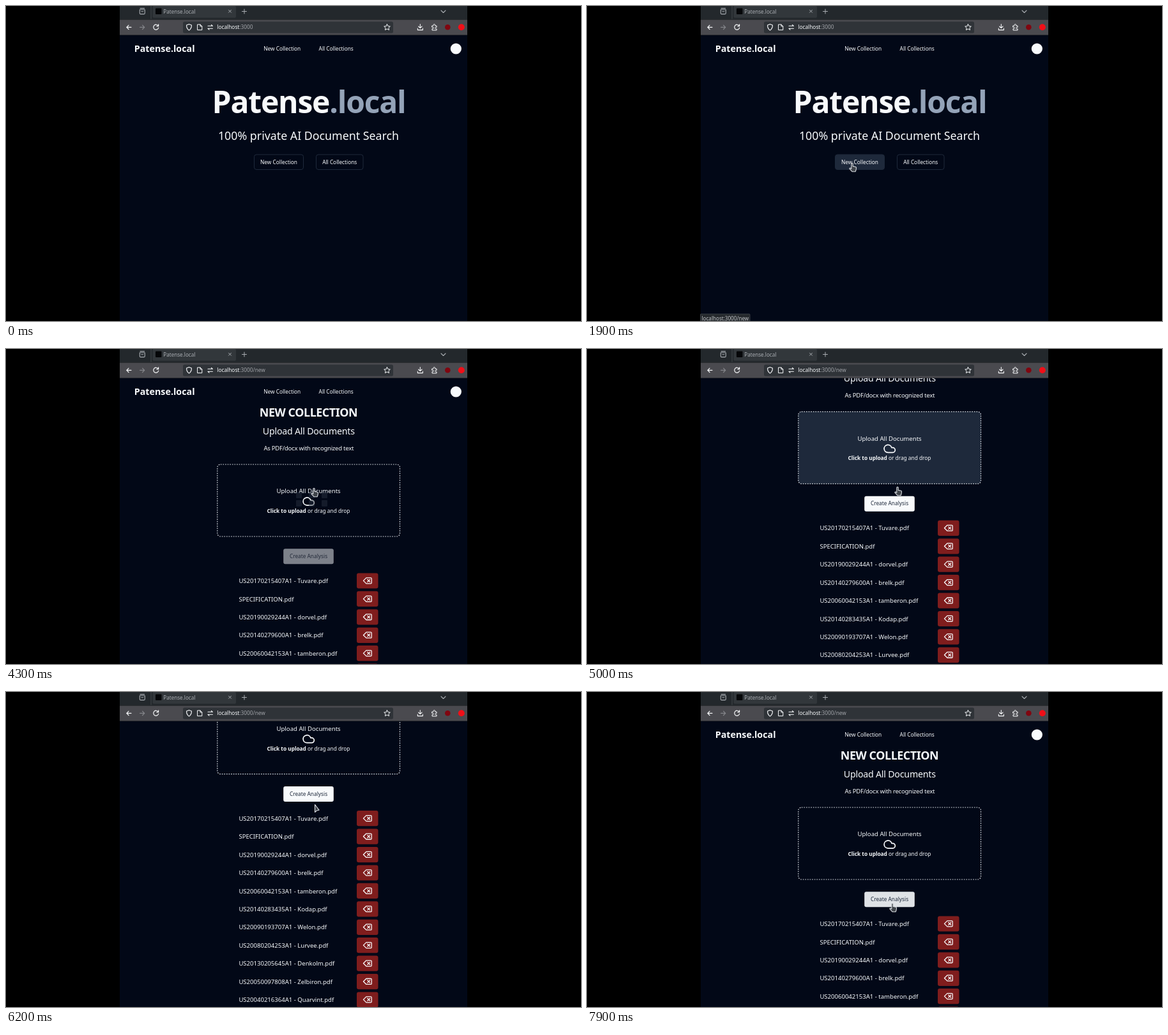
Write an HTML page that moves like this. It is 900 px wide and 494 px high and loops after 8 s.

```html
<!DOCTYPE html>
<html lang="en">
<head>
<meta charset="utf-8">
<title>Patense.local</title>
<style>
html, body { margin: 0; width: 100%; height: 100%; overflow: hidden; background: #000; }
svg { display: block; width: 900px; height: 494px; font-family: "Noto Sans", sans-serif; }
text { white-space: pre; }
</style>
</head>
<body>
<svg id="stage" viewBox="0 0 900 494" xmlns="http://www.w3.org/2000/svg"></svg>
<script>
const LOOP = 8000, STEP = 100;
const INK = '#f8fafc', PAGE = '#020817', SLATE = '#1e293b', RED = '#7f1d1d';
const stage = document.getElementById('stage');

const text = (x, y, size, str, o = {}) =>
  `<text x="${x}" y="${y}" font-size="${size}" fill="${o.fill || INK}" font-weight="${o.weight || 400}"` +
  ` text-anchor="${o.anchor || 'middle'}" letter-spacing="${(o.track || 0) * size}">${str}</text>`;
const left = (x, y, size, str, o = {}) => text(x, y, size, str, { ...o, anchor: 'start' });
const rect = (x, y, w, h, fill, r = 0, extra = '') =>
  `<rect x="${x}" y="${y}" width="${w}" height="${h}" rx="${r}" fill="${fill}" ${extra}/>`;
const line = (d, color = INK, w = 1.2) =>
  `<path d="${d}" fill="none" stroke="${color}" stroke-width="${w}" stroke-linecap="round" stroke-linejoin="round"/>`;
const dot = (x, y, r, fill) => `<circle cx="${x}" cy="${y}" r="${r}" fill="${fill}"/>`;
// 24-unit icon centred on (x, y)
const icon = (x, y, s, d) =>
  `<g transform="translate(${x} ${y}) scale(${s}) translate(-12 -12)">${line(d, INK, 2)}</g>`;

const CLOUD = 'M17.5 19H9a7 7 0 1 1 6.71-9h1.79a4.5 4.5 0 1 1 0 9Z';
const ERASE = 'M20 5H9l-7 7 7 7h11a2 2 0 0 0 2-2V7a2 2 0 0 0-2-2ZM18 9l-6 6M12 9l6 6';
const HAND = 'M3.2 9.2V1.4a1.2 1.2 0 0 1 2.4 0V5.4l4.2.9q1.2.4 1.1 1.8l-.5 3.2-.9 2.5H4.6L.4 9.4q-.4-1.3.8-1.4Z';
const ARROW = 'M.5 .5V12.5L3.4 10 7 9.2Z';

const FILES = [
  'US20170215407A1 - Tuvare', 'SPECIFICATION', 'US20190029244A1 - dorvel',
  'US20140279600A1 - brelk', 'US20060042153A1 - tamberon', 'US20140283435A1 - Kodap',
  'US20090193707A1 - Welon', 'US20080204253A1 - Lurvee', 'US20130205645A1 - Denkolm',
  'US20050097808A1 - Zelbiron', 'US20040216364A1 - Quarvint'
];

// page areas that react to the pointer: x, y, width, height
const NEW_BUTTON = [388, 233, 78, 24];
const DROP_ZONE = [330.8, 181, 285.7, 113];
const CREATE = [434.2, 313.3, 78.6, 24];

// moments of the session, in ms
const OPENED = 2300, DRAG = 3200, DROP = 4200, READY = 4400;

// time, x, y of the pointer tip
const PATH = [
  [900, 910, 328], [1000, 712, 328], [1100, 636, 400], [1300, 630, 404], [1800, 415, 246],
  [2300, 415, 246], [2900, 868, 300], [3000, 910, 300], [3100, 910, 300], [3200, 782, 286],
  [3900, 482, 218], [4300, 482, 218], [4700, 486, 216], [5200, 486, 216], [5900, 483, 176],
  [6900, 483, 176], [7400, 480, 300], [7800, 478, 331]
];

const clamp = v => Math.max(0, Math.min(1, v));
const ease = v => v * v * (3 - 2 * v);
const ramp = (t, a, b) => ease(clamp((t - a) / (b - a)));
const within = (t, a, b) => t >= a && t < b;

function pointerAt(t) {
  const i = PATH.findIndex(p => t <= p[0]);
  if (i < 1) return PATH[i < 0 ? PATH.length - 1 : 0].slice(1);
  const [t0, x0, y0] = PATH[i - 1], [t1, x1, y1] = PATH[i];
  const k = ease((t - t0) / (t1 - t0));
  return [x0 + (x1 - x0) * k, y0 + (y1 - y0) * k];
}

const scrollAt = t => 165.3 * (ramp(t, 4800, 5200) - ramp(t, 6300, 6900));

// hover reacts one step late
function over(t, [x, y, w, h]) {
  const [px, py] = pointerAt(t - STEP);
  return within(px, x, x + w) && within(py + scrollAt(t - STEP), y, y + h);
}

function browser(active, url) {
  const dim = active ? INK : '#a9adb2';
  return rect(178, 0, 544, 21.5, active ? '#31363b' : '#23282c') +
    rect(178, 21.5, 544, 24, '#4a4a4f') +
    rect(229.5, 0, 130.5, 18.5, active ? '#4a4a4f' : '#32373b', 2) +
    line('M227 0V20', '#4a4e53', .8) +
    rect(234, 3.5, 9.5, 9.5, '#050608', 1) +
    left(246.3, 12, 8.1, 'Patense.local', { fill: dim }) +
    line('M348.5 6.2l4 4m0-4l-4 4', dim, 1) +
    line('M369.5 8.5h7m-3.5-3.5v7', dim, 1) +
    line('M681 7l3.5 3.5L688 7', dim, 1.1) +
    line('M209.3 5.8h8v5.4q0 1.4-1.4 1.4h-5.2q-1.4 0-1.4-1.4ZM210 3.6h6.6M211.8 8.8h3', dim, 1.1) +
    line('M196 33.3h-7.2m3.2-3.2l-3.2 3.2 3.2 3.2') +
    line('M209.6 33.3h7.2m-3.2-3.2l3.2 3.2-3.2 3.2', '#85868b') +
    line('M238.3 31.2a4 4 0 1 0 .4 3M238.6 28.8v2.8h-2.8') +
    rect(277, 24.5, 329, 18, '#2f3338', 2.5) +
    line('M286.5 28.6l3.9 1.5q.2 5.4-3.9 8-4.1-2.6-3.9-8Z', INK, 1.1) +
    line('M300 29h4l2.8 2.8v5.8H300ZM304 29v2.8h2.8', INK, 1) +
    line('M316 31.3h7.4m-2-1.8l2 1.8M323.4 35.3H316m2 1.8l-2-1.8', INK, 1.1) +
    left(330.3, 36.2, 8.3, `localhost<tspan fill="#a0a3a8">:3000${url}</tspan>`) +
    line('M596.5 28.6l1.5 3 3.3.4-2.4 2.3.6 3.3-3-1.6-3 1.6.6-3.3-2.4-2.3 3.3-.4Z', INK, 1) +
    line('M648.3 28.5v6m-2.7-2.5l2.7 2.6 2.7-2.6M644.3 35v2.6h8V35', INK, 1.1) +
    line('M667 31h2v-1.2a1.3 1.3 0 0 1 2.6 0V31h2.4v2.4h-1.2a1.2 1.2 0 0 0 0 2.4h1.2V38h-7v-2.4h1a1.2 1.2 0 0 0 0-2.4h-1Z', INK, 1) +
    dot(691.3, 33.2, 4.3, '#800610') + dot(712.8, 33.2, 5, '#f00f18');
}

const header = () =>
  left(200.7, 72.2, 14.3, 'Patense.local', { weight: 700 }) +
  text(432.2, 70, 8.3, 'New Collection', { weight: 500 }) +
  text(516.7, 70, 8.3, 'All Collections', { weight: 500 }) +
  dot(704.3, 67, 8.6, INK);

const homeButton = ([x, y, w, h], label, hover) =>
  rect(x + .5, y, w - 1, h - .5, hover ? SLATE : 'none', 3.5, `stroke="${SLATE}"`) +
  text(x + w / 2, y + 14.6, 8.3, label, { weight: 500 });

const home = t =>
  text(474, 168.2, 48, 'Patense<tspan fill="#94a3b8">.local</tspan>', { weight: 700, track: -.025 }) +
  text(473.5, 210.2, 17.8, '100% private AI Document Search') +
  homeButton(NEW_BUTTON, 'New Collection', over(t, NEW_BUTTON)) +
  homeButton([485, 233, 74.5, 24], 'All Collections', false);

function fileRow(name, i) {
  const y = 363.6 + 28.43 * i;
  return left(364.4, y + 3.5, 9.55, name + '.pdf') +
    rect(549, y - 12.2, 33.5, 24.2, RED, 3) +
    icon(565.8, y - .2, .64, ERASE);
}

function fileList(t) {
  const busy = t < READY;
  const fill = busy ? '#7d818a' : over(t, CREATE) ? '#dfe2e6' : INK;
  return rect(...CREATE, fill, 3) +
    text(473.5, 328, 8.3, 'Create Analysis', { weight: 500, fill: busy ? '#242b3a' : SLATE }) +
    FILES.map(fileRow).join('');
}

const uploadPage = t =>
  text(473.5, 106, 17.9, 'NEW COLLECTION', { weight: 700, track: -.025 }) +
  text(473.8, 134, 14.2, 'Upload All Documents', { track: -.015 }) +
  text(473.8, 158.8, 9.5, 'As PDF/docx with recognized text', { track: -.025 }) +
  rect(...DROP_ZONE, t >= READY && over(t, DROP_ZONE) ? SLATE : 'none', 5,
    'stroke="#d1d5db" stroke-width="1.2" stroke-dasharray="1.8 1.8"') +
  text(473.6, 226.4, 9.6, 'Upload All Documents') +
  icon(473.7, 239, .86, CLOUD) +
  text(473.4, 257, 8.3, '<tspan font-weight="700">Click to upload</tspan> or drag and drop') +
  (t >= DROP ? fileList(t) : '');

function dragGhost(x, y, alpha) {
  let tiles = '';
  for (let i = 0; i < 6; i++)
    tiles += rect(x - 28 + (i % 3) * 20, y + 6 + (i > 2) * 13, 9, 10, '#2b3442', 1);
  return `<g opacity="${alpha}">${tiles}</g>`;
}

function pointer(t) {
  const [x, y] = pointerAt(t);
  const dragging = within(t, DRAG, READY);
  const hand = dragging || (t < OPENED ? over(t, NEW_BUTTON)
    : t >= READY && (over(t, DROP_ZONE) || over(t, CREATE)));
  const at = hand ? `${x - 4.4} ${y}` : `${x} ${y}`;
  return (dragging ? dragGhost(x, y, t < DROP ? .9 : .45) : '') +
    `<path transform="translate(${at})" d="${hand ? HAND : ARROW}" fill="#3f444a"` +
    ' stroke="#d8dbe0" stroke-width="1.1" stroke-linejoin="round"/>';
}

const statusBar = () =>
  rect(177.5, 483, 77.5, 12, '#25292d', 1, 'stroke="#43484d" stroke-width=".8"') +
  left(179.5, 493, 8.1, 'localhost:3000/new', { fill: '#c3c6ca' });

function draw(t) {
  const opened = t >= OPENED;
  stage.innerHTML =
    '<clipPath id="view"><rect x="178" y="45.5" width="544" height="448.5"/></clipPath>' +
    rect(0, 0, 900, 494, '#000') +
    rect(178, 45.5, 544, 448.5, PAGE) +
    `<g clip-path="url(#view)"><g transform="translate(0 ${-scrollAt(t)})">` +
    header() + (opened ? uploadPage(t) : home(t)) + '</g></g>' +
    browser(within(t, OPENED - STEP, DRAG), opened ? '/new' : '') +
    (!opened && over(t, NEW_BUTTON) ? statusBar() : '') + pointer(t);
}

let shown = -1;
function tick() {
  const t = Math.floor(performance.now() % LOOP / STEP) * STEP;
  if (t !== shown) draw(shown = t);
  requestAnimationFrame(tick);
}
tick();
</script>
</body>
</html>
```
